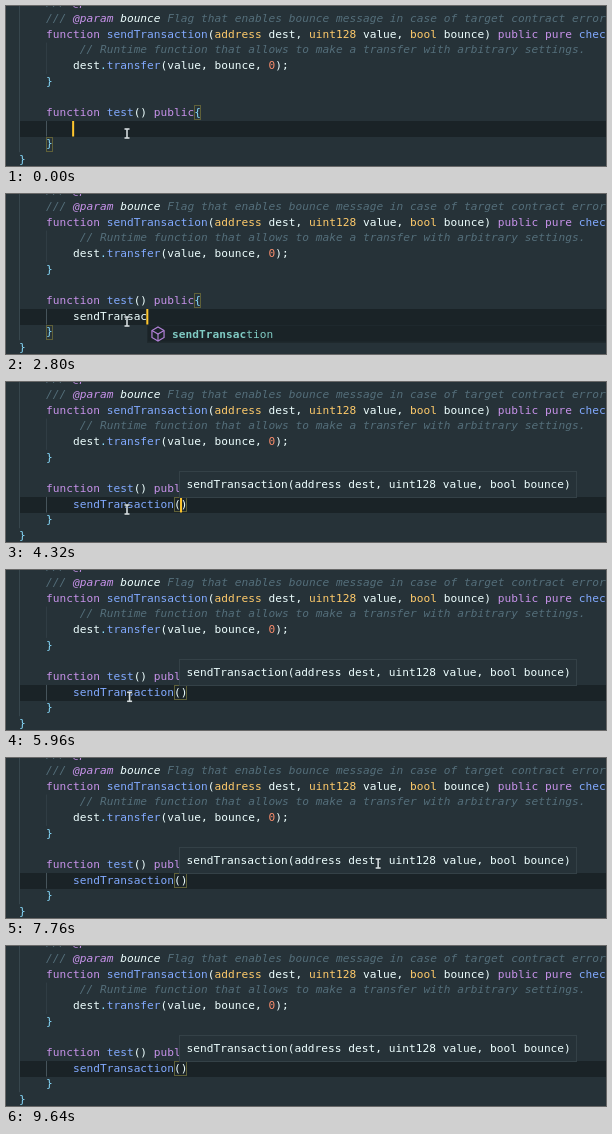
An HTML page with a canvas that plays this animation: 600 px wide and 160 px high, repeating every 10000 ms.

```html
<!DOCTYPE html>
<html>
<head>
<meta charset="utf-8">
<style>
html, body { margin: 0; width: 600px; height: 160px; overflow: hidden; background: #263238; }
canvas { display: block; }
</style>
</head>
<body>
<canvas width="600" height="160"></canvas>
<script>
const ctx = document.querySelector('canvas').getContext('2d');
const LOOP = 10000, CHAR = 6.743, ROW = 15.67, LEFT = 13, TOP = 5.2, BASE = 10.8;
const BG = '#263238', DARK = '#1a2327';
const WHITE = '#eeffff', PURPLE = '#c792ea', BLUE = '#82aaff', YELLOW = '#ffcb6b',
  CYAN = '#89ddff', ORANGE = '#f78c6c', GRAY = '#546e7a', TEAL = '#80cbc4';

const WORD = 'sendTransaction';
const ARGS = [[YELLOW, 'address'], [WHITE, ' dest, '], [YELLOW, 'uint128'], [WHITE, ' value, '],
  [YELLOW, 'bool'], [WHITE, ' bounce']];
// row, column, style, coloured parts
const LINES = [
  [-1, 4, 'italic', [[GRAY, '/// '], [PURPLE, '@param']]],
  [0, 4, 'italic', [[GRAY, '/// '], [PURPLE, '@param '], [WHITE, 'bounce '],
    [GRAY, 'Flag that enables bounce message in case of target contract error']]],
  [1, 4, '', [[PURPLE, 'function '], [BLUE, WORD], [WHITE, '('], ...ARGS, [WHITE, ') '],
    [PURPLE, 'public pure '], [BLUE, 'chec']]],
  [2, 9, 'italic', [[GRAY, '// Runtime function that allows to make a transfer with arbitrary settings.']]],
  [3, 8, '', [[WHITE, 'dest'], [CYAN, '.'], [BLUE, 'transfer'], [WHITE, '(value, bounce, '],
    [ORANGE, '0'], [WHITE, ');']]],
  [4, 4, '', [[CYAN, '}']]],
  [6, 4, '', [[PURPLE, 'function '], [BLUE, 'test'], [WHITE, '() '], [PURPLE, 'public'], [CYAN, '{']]],
  [8, 4, '', [[CYAN, '}']]],
  [9, 0, '', [[CYAN, '}']]]
];

const KEYS = [40, 320, 640, 920, 1480, 1720, 1960, 2160, 2360, 2520, 2800, 2960, 3080, 3200, 3320];
const BLINKS = [1400, 1480, 3760, 4120, 4640, 5120, 5680, 6160, 6640, 7160, 7640, 8160, 8640, 9120, 9640];
const LIST_AT = 200, CALL_AT = 4120, TIP_AT = 4320;
// time, x, y
const MOUSE = [[0, 121, 127.5], [5940, 121, 127.5], [6760, 222, 100.5], [7760, 372, 105.5],
  [8120, 421, 107], [9100, 520, 172], [LOOP, 520, 172]];

const colX = col => LEFT + col * CHAR;
const rowY = row => TOP + row * ROW;

function box(x, y, w, h, fill, border) {
  ctx.fillStyle = fill;
  ctx.fillRect(x, y, w, h);
  if (border) {
    ctx.strokeStyle = border;
    ctx.lineWidth = 1;
    ctx.strokeRect(x + .5, y + .5, w - 1, h - 1);
  }
}

function path(points, color, width) {
  ctx.strokeStyle = color;
  ctx.lineWidth = width;
  ctx.beginPath();
  points.forEach(([x, y], i) => i ? ctx.lineTo(x, y) : ctx.moveTo(x, y));
  ctx.stroke();
}

// A large font scaled down keeps fractional character widths.
function text(str, x, baseline, color, style = '') {
  ctx.save();
  ctx.translate(x, baseline);
  ctx.scale(.1, .1);
  ctx.font = style + ' 112px "DejaVu Sans Mono", monospace';
  ctx.fillStyle = color;
  ctx.fillText(str, 0, 0);
  ctx.restore();
  return x + str.length * CHAR;
}

function bracketBox(col, row, count = 1) {
  box(Math.round(colX(col)), Math.round(rowY(row)), Math.round(count * CHAR), 15, 'transparent', '#5f6038');
}

function guide(x, row, count, color) {
  box(x, rowY(row), 1, count * ROW, color);
}

function cube(x, y) {
  const corner = i => [x + 7 * Math.sin(i * Math.PI / 3), y - 7 * Math.cos(i * Math.PI / 3)];
  path([0, 1, 2, 3, 4, 5, 0, 1].map(corner), '#b180d7', 1.2);
  path([corner(5), [x, y], corner(1)], '#b180d7', 1.2);
  path([[x, y], corner(3)], '#b180d7', 1.2);
}

function wrench(x, y) {
  path([[x - 6, y + 6], [x + 1, y - 1]], WHITE, 3);
  path([[x - 5.5, y + 5.5], [x + 1, y - 1]], BG, 1);
  ctx.strokeStyle = WHITE;
  ctx.lineWidth = 1.4;
  ctx.beginPath();
  ctx.arc(x + 3, y - 2, 3.6, -.3, 4.9);
  ctx.stroke();
}

function suggestions(x, typed) {
  const width = 484, y = 131;
  box(x, y, width, 17.5, DARK, '#1e282d');
  cube(x + 11, 140);
  const end = text(WORD.slice(0, typed), x + 25, 143.7, TEAL, 'bold');
  text(WORD.slice(typed), end, 143.7, TEAL);
  if (typed > 4) return;
  box(x, 148, width, 12, BG);
  box(x, y, 1, 29, '#1e282d');
  wrench(x + 11, 155);
  let tx = text('msg.', x + 25, 159, WHITE);
  tx = text('sender'.slice(0, typed), tx, 159, TEAL, 'bold');
  text('sender'.slice(typed), tx, 159, WHITE);
  box(x + width, y, 200, 40, BG, '#1e282d');
  text('function', x + width + 5, 148.5, '#b4c3c8');
}

function mouse(t) {
  const i = MOUSE.findIndex(p => p[0] > t);
  const [t0, x0, y0] = MOUSE[i - 1], [t1, x1, y1] = MOUSE[i];
  const k = (t - t0) / (t1 - t0);
  const x = x0 + (x1 - x0) * k, y = y0 + (y1 - y0) * k;
  for (const [color, width] of [['#1a2327', 2.6], ['#d5dcdf', 1.6]]) {
    path([[x, y - 4.5], [x, y + 4.5]], color, width);
    for (const side of [-4.5, 4.5]) path([[x - 2.5, y + side], [x + 2.5, y + side]], color, width);
  }
}

function draw(t) {
  const typed = KEYS.filter(k => k <= t).length;
  const called = t >= CALL_AT;
  const caretX = colX(8 + typed + (called ? 1 : 0));
  const caretOn = BLINKS.filter(b => b <= t).length % 2 === 0;

  box(0, 0, 600, 160, BG);
  box(LEFT, 115, 587, 16, DARK);
  guide(13, -1, 10, '#37464d');
  guide(40, 2, 2, '#303d44');
  guide(40, 7, 1, '#46545b');

  for (const [row, col, style, parts] of LINES) {
    let x = colX(col);
    for (const [color, str] of parts) x = text(str, x, rowY(row) + BASE, color, style);
  }
  const base = rowY(7) + BASE;
  const end = text(WORD.slice(0, typed), colX(8), base, called ? BLUE : WHITE);
  if (called) {
    bracketBox(23, 7, 2);
    text('()', end, base, WHITE);
  } else {
    bracketBox(26, 6);
    bracketBox(4, 8);
  }
  if (caretOn) box(caretX - .8, 115, 2, 15.5, '#ffc62e');

  if (t >= LIST_AT && !called) suggestions(Math.round(caretX), typed);
  if (t >= TIP_AT) {
    box(173, 89, 398, 27, BG, '#344147');
    text(WORD + '(address dest, uint128 value, bool bounce)', 180.5, 106.3, WHITE);
  }
  mouse(t);
}

function tick() {
  draw(performance.now() % LOOP);
  requestAnimationFrame(tick);
}
tick();
</script>
</body>
</html>
```
